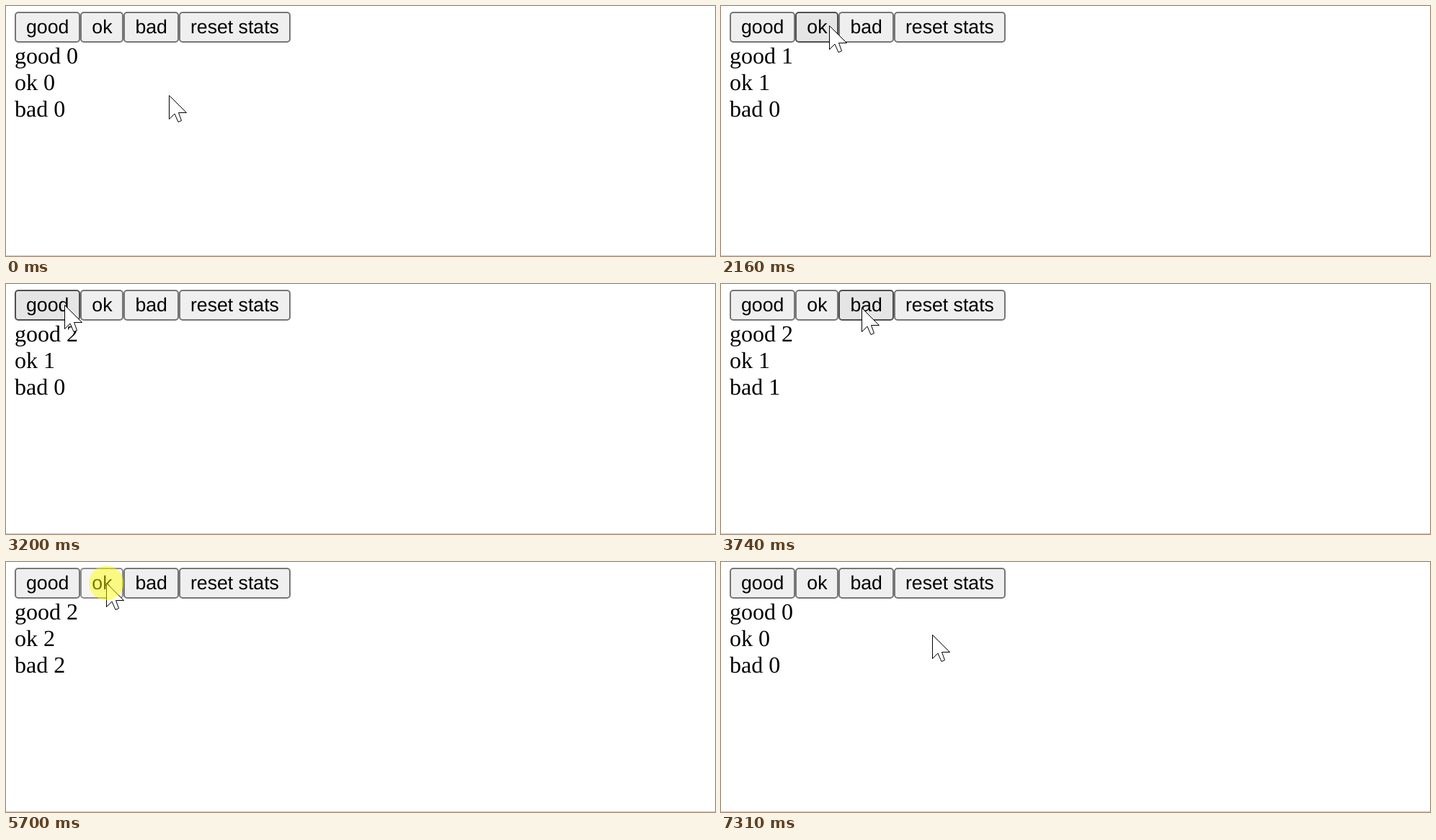
Recreate the animation shown at these times as an HTML page. Size 984 by 348 pixels, loop 8.98 s.

```html
<!DOCTYPE html>
<html lang="en">
<head>
<meta charset="utf-8">
<title>Feedback buttons</title>
<style>
  html, body { margin: 0; width: 100%; height: 100%; overflow: hidden; background: #fff; }
  svg { display: block; width: 984px; height: 348px; }
  .button rect { fill: #efefef; stroke: #767676; stroke-width: 2; }
  .button.hover rect { fill: #e5e5e5; stroke: #4f4f4f; }
  .button.active rect { fill: #f5f5f5; stroke: #8d8d8d; }
  .button text { font: 26.667px Arial, "Liberation Sans", sans-serif; }
  .stat { font: 32px "Times New Roman", "Liberation Serif", serif; }
  text { text-rendering: geometricPrecision; }
  #click { fill: #ff0; fill-opacity: .47; }
</style>
</head>
<body>
<svg viewBox="0 0 984 348">
  <rect y="347" width="984" height="1" fill="#cacaca"/>
  <g id="page"></g>
  <g id="pointer">
    <path d="M.5 .5V33.5L8 26L13 37.5L17.5 35.5L13.5 24.5H24.5Z" fill="#fff" stroke="#000"/>
    <circle id="click" r="24"/>
  </g>
</svg>
<script>
const LOOP = 8980;
const TICK = 67;
const LEFT = 12, TOP = 8, HEIGHT = 43, PADDING = 16, ROW = 37;
const labels = ['good', 'ok', 'bad', 'reset stats'];

// The pointer's path: when each move starts, its ticks, and where it ends.
const start = { x: 226, y: 124 };
const moves = [
  { at: 860, ticks: 7, x: 79, y: 27 },
  { at: 1620, ticks: 4, x: 150, y: 27 },
  { at: 2230, ticks: 7, x: 31, y: 27 },
  { at: 3190, ticks: 6, x: 195, y: 33 },
  { at: 4530, ticks: 6, x: 134, y: 29 },
  { at: 5350, ticks: 2, x: 139, y: 29 },
  { at: 6100, ticks: 5, x: 279, y: 30 },
  { at: 7030, ticks: 5, x: 293, y: 101 }
];
const pressTimes = [1420, 2030, 2910, 3670, 4330, 5070, 5700, 6700];

const page = document.getElementById('page');
const pointer = document.getElementById('pointer');
const click = document.getElementById('click');

function add(parent, name, attrs) {
  const node = document.createElementNS('http://www.w3.org/2000/svg', name);
  for (const key in attrs) node.setAttribute(key, attrs[key]);
  return parent.appendChild(node);
}

// Buttons sit side by side, each as wide as its label plus padding.
let edge = LEFT;
const buttons = labels.map(label => {
  const node = add(page, 'g', { class: 'button' });
  const box = add(node, 'rect', { y: TOP + 1, height: HEIGHT - 2, rx: 4 });
  const text = add(node, 'text', { x: edge + PADDING, y: TOP + 30 });
  text.textContent = label;
  const left = Math.round(edge);
  edge += text.getComputedTextLength() + 2 * PADDING;
  const right = Math.round(edge);
  box.setAttribute('x', left + 1);
  box.setAttribute('width', right - left - 2);
  return { node, left, right };
});

const stats = labels.slice(0, 3).map((label, i) =>
  add(page, 'text', { class: 'stat', x: LEFT, y: 80 + ROW * i }));

const easeOut = p => p * (2 - p);

// The pointer advances once per tick.
function pointerAt(t) {
  let { x, y } = start;
  for (const move of moves) {
    if (t < move.at) break;
    const tick = Math.min(move.ticks, Math.floor((t - move.at) / TICK) + 1);
    const p = easeOut(tick / move.ticks);
    x += (move.x - x) * p;
    y += (move.y - y) * p;
  }
  return { x: Math.round(x), y: Math.round(y) };
}

const buttonUnder = ({ x, y }) => y < TOP || y >= TOP + HEIGHT ? -1 :
  buttons.findIndex(b => x >= b.left && x < b.right);

const presses = pressTimes.map(at => ({ at, button: buttonUnder(pointerAt(at)) }));

function draw(t) {
  const spot = pointerAt(t);
  const hover = buttonUnder(spot);
  const down = presses.some(p => t >= p.at && t < p.at + TICK);
  const counts = labels.map(() => 0);
  for (const { at, button } of presses) {
    if (t < at + TICK) break;
    if (button < stats.length) counts[button]++;
    else counts.fill(0);
  }

  buttons.forEach(({ node }, i) => {
    const state = i !== hover ? '' : down ? ' active' : ' hover';
    node.setAttribute('class', 'button' + state);
  });
  stats.forEach((node, i) => { node.textContent = `${labels[i]} ${counts[i]}`; });
  pointer.setAttribute('transform', `translate(${spot.x} ${spot.y})`);
  click.setAttribute('visibility', down ? 'visible' : 'hidden');
}

const begin = performance.now();
function frame() {
  draw((performance.now() - begin) % LOOP);
  requestAnimationFrame(frame);
}
frame();
</script>
</body>
</html>
```
